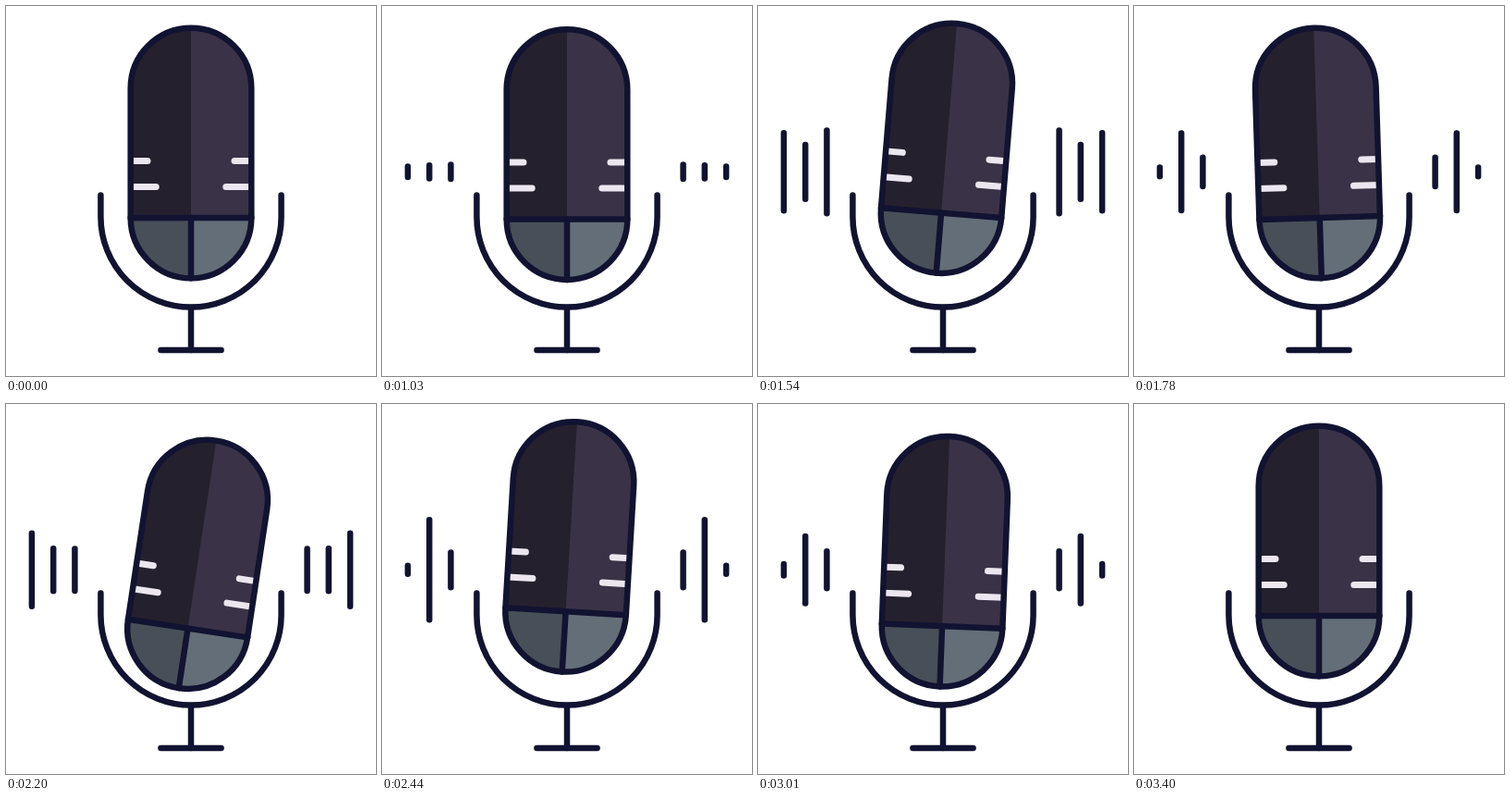
An HTML page with a canvas for the animation above (3.43 s loop, 400 by 400 pixels).

```html
<!DOCTYPE html>
<html lang="en">
<head>
<meta charset="utf-8">
<title>Microphone</title>
<style>
  html, body { margin: 0; width: 100%; height: 100%; overflow: hidden; background: #fff; }
  canvas { display: block; width: 400px; height: 400px; }
</style>
</head>
<body>
<canvas id="stage" width="400" height="400"></canvas>
<script>
const ctx = document.getElementById('stage').getContext('2d');
const LOOP = 3430, START = 1030, END = 3400, STEP = 30;
const RISE_FROM = 975, FADE_TO = 3380;
const NAVY = '#121331', PALE = '#ebe6ef';
const CX = 200, PIVOT_Y = 206, BAR_Y = 179.3;
const CAP_Y = 89, BASE_Y = 229, RADIUS = 65.3;
const TAU = Math.PI * 2;

// Sound bars from the inside out; each swings around its mean length.
const bars = [
  { x: 125.6, mean: 54, swing: 36.6, period: 393, peak: 1134 },
  { x: 148.8, mean: 78.5, swing: 32.5, period: 571, peak: 1338 },
  { x: 172.1, mean: 50, swing: 41, period: 641, peak: 2120 }
];

const wave = (t, peak, period) => Math.cos(TAU * (t - peak) / period);

function ease(x) {
  const u = Math.min(1, Math.max(0, x));
  return u * u * (3 - 2 * u);
}

const strength = t => ease((t - RISE_FROM) / 150) * ease((FADE_TO - t) / 600);

// A bounce whose beat slows a little over time.
function bounce(t) {
  const s = t - 1222;
  return strength(t) * (5.5 + 13.5 * Math.cos(s * (0.00814 - 8.1e-7 * s)));
}

// A sway that swells toward the middle of the motion.
function tilt(t) {
  const swell = Math.sin(Math.PI * (t - RISE_FROM) / (FADE_TO - RISE_FROM)) ** 2;
  return swell * (1.9 + 8.6 * wave(t, 2280, 750));
}

function line(x0, y0, x1, y1) {
  ctx.beginPath();
  ctx.moveTo(x0, y0);
  ctx.lineTo(x1, y1);
  ctx.stroke();
}

function fillRect(x, y, w, h, color) {
  ctx.fillStyle = color;
  ctx.fillRect(x, y, w, h);
}

function drawStand() {
  ctx.beginPath();
  ctx.moveTo(102.4, 204.5);
  ctx.arc(CX, 228, 97.6, Math.PI, 0, true);
  ctx.lineTo(297.6, 204.5);
  ctx.stroke();
  line(CX, 326, CX, 372);
  line(167.4, 372, 232.6, 372);
}

function drawMic(dy, degrees) {
  ctx.save();
  ctx.translate(CX, PIVOT_Y + dy);
  ctx.rotate(degrees * Math.PI / 180);
  ctx.translate(-CX, -PIVOT_Y);

  const left = CX - RADIUS, right = CX + RADIUS;
  const body = new Path2D();
  body.arc(CX, CAP_Y, RADIUS, Math.PI, 0);
  body.arc(CX, BASE_Y, RADIUS, 0, Math.PI);
  body.closePath();

  ctx.save();
  ctx.clip(body);
  fillRect(left, 20, RADIUS * 2, BASE_Y - 20, '#3a3347');
  fillRect(left, 20, RADIUS, BASE_Y - 20, '#25202d');
  fillRect(left, BASE_Y, RADIUS * 2, RADIUS + 5, '#646e78');
  fillRect(left, BASE_Y, RADIUS, RADIUS + 5, '#484f58');
  ctx.strokeStyle = PALE;
  ctx.lineWidth = 7;
  for (const [y, reach] of [[167.5, 47], [195.5, 37.8]]) {
    line(left, y, CX - reach, y);
    line(CX + reach, y, right, y);
  }
  ctx.restore();

  line(left, BASE_Y, right, BASE_Y);
  line(CX, BASE_Y, CX, BASE_Y + RADIUS);
  ctx.stroke(body);
  ctx.restore();
}

function drawBars(t) {
  for (const { x, mean, swing, period, peak } of bars) {
    const half = strength(t) * (mean + swing * wave(t, peak, period)) / 2;
    for (const side of [-1, 1]) {
      line(CX + side * x, BAR_Y - half, CX + side * x, BAR_Y + half);
    }
  }
}

function draw(time) {
  fillRect(0, 0, 400, 400, '#fff');
  ctx.strokeStyle = NAVY;
  ctx.lineWidth = 6.5;
  ctx.lineCap = ctx.lineJoin = 'round';
  drawStand();
  if (time < START || time >= END) {
    drawMic(0, 0);
    return;
  }
  const t = START + Math.floor((time - START) / STEP) * STEP;
  if (t < FADE_TO) drawBars(t);
  drawMic(bounce(t), tilt(t));
}

const origin = performance.now();
function tick() {
  draw((performance.now() - origin) % LOOP);
  requestAnimationFrame(tick);
}
tick();
</script>
</body>
</html>
```
